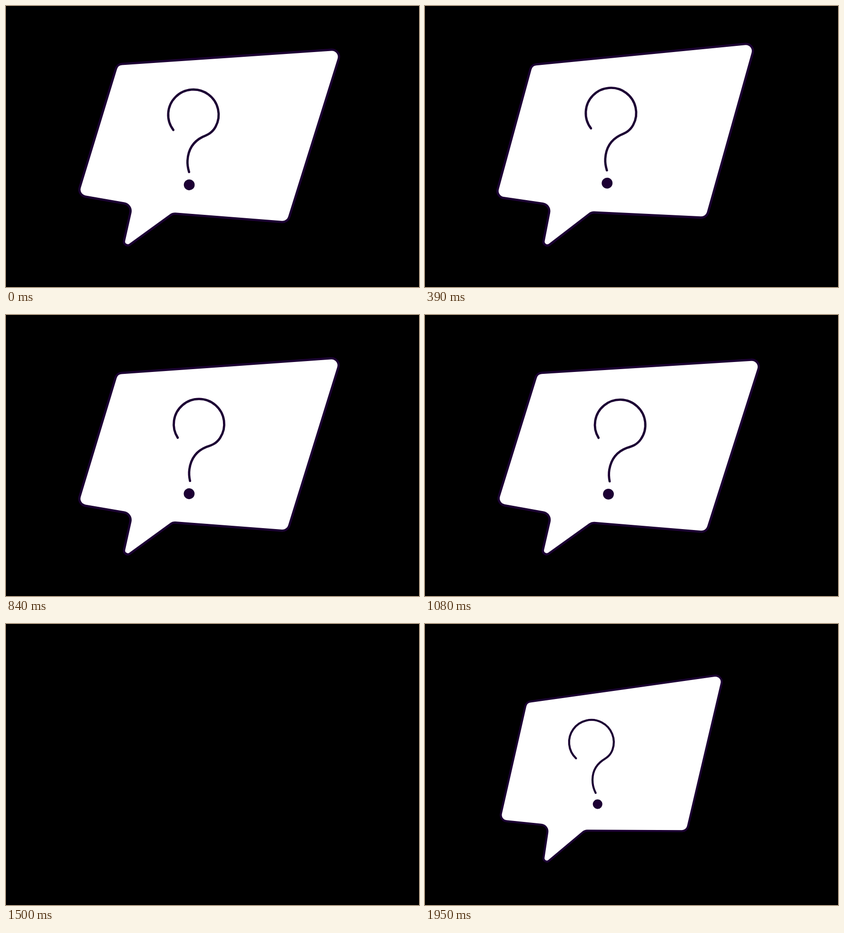
Animation, 868 px wide and 592 px high, one loop 1.98 s. Source, as an HTML page with a canvas:

```html
<!DOCTYPE html>
<html lang="en">
<head>
<meta charset="utf-8">
<title>Question bubble</title>
<style>
  html, body { margin: 0; width: 868px; height: 592px; overflow: hidden; background: #000; }
  canvas { display: block; }
</style>
</head>
<body>
<canvas id="stage" width="868" height="592"></canvas>
<script>
const ctx = document.getElementById('stage').getContext('2d');
const LOOP = 1980, STEP = 30, INK = '#1c0033';
const LEAVE = 1080, GONE = 1500, ENTER = 1800;

// Corners of the bubble at rest: x, y, radius
const corners = [
  [235.1, 122.6, 14], [707, 92.3, 15], [591.7, 457.2, 15], [350.7, 437.6, 15],
  [243.2, 515, 8], [265.2, 418.8, 16], [150.2, 398.2, 15]
];

const bubble = new Path2D();
bubble.moveTo(470, 107.5);
corners.forEach((_, i) => {
  const [x, y, r] = corners[(i + 1) % corners.length];
  const [nx, ny] = corners[(i + 2) % corners.length];
  bubble.arcTo(x, y, nx, ny, r);
});
bubble.closePath();

// Question mark drawn upright, with its dot at the origin
const hook = new Path2D('M-40.2-113.4A53 53 0 1 1 48-125.6' +
  'C42-112.6 33-108 22-102.5C9-95-6.7-80-6.7-51C-6.7-43-5-35-2-27');
const dot = new Path2D();
dot.arc(0, 0, 11.4, 0, 7);

// Steady turn up to time 0, then a damped swing; degrees
function swing(t, start, speed, amp) {
  if (t < 0) return Math.max(start, speed * t);
  return amp * Math.exp(-0.00343 * t) * Math.sin(Math.PI * t / 220);
}

function backIn(u) {
  return u * u * (3.8 * u - 2.8);
}

function scaleAt(t) {
  if (t >= ENTER) return 1 - (1 - (t - ENTER) / 182) ** 1.25;
  if (t >= GONE) return 0;
  return t > LEAVE ? 1 - backIn((t - LEAVE) / (GONE - LEAVE)) : 1;
}

function around(x, y, change) {
  ctx.translate(x, y);
  change();
  ctx.translate(-x, -y);
}

function turn(degrees) {
  ctx.rotate(degrees * Math.PI / 180);
}

function draw(t) {
  ctx.setTransform(1, 0, 0, 1, 0, 0);
  ctx.fillStyle = '#000';
  ctx.fillRect(0, 0, 868, 592);
  const scale = scaleAt(t);
  if (scale <= 0) return;

  const entering = t >= ENTER;
  const time = entering ? t - LOOP : t;
  around(entering ? 235 : 287, 467, () => ctx.scale(scale, scale));
  around(265, 455, () => turn(swing(time - 1.5, -25, 0.138, 10.8)));

  ctx.strokeStyle = INK;
  ctx.lineWidth = 4.8;
  ctx.lineCap = 'round';
  ctx.fillStyle = '#fff';
  ctx.fill(bubble);
  ctx.stroke(bubble);

  ctx.translate(385.4, 377.2);
  turn(9.2 + swing(time - 34, -30, 0.164, 15));
  ctx.stroke(hook);
  ctx.fillStyle = INK;
  ctx.fill(dot);
}

const begin = performance.now();
function tick() {
  const t = (performance.now() - begin) % LOOP;
  draw(Math.floor(t / STEP) * STEP);
  requestAnimationFrame(tick);
}
tick();
</script>
</body>
</html>
```
